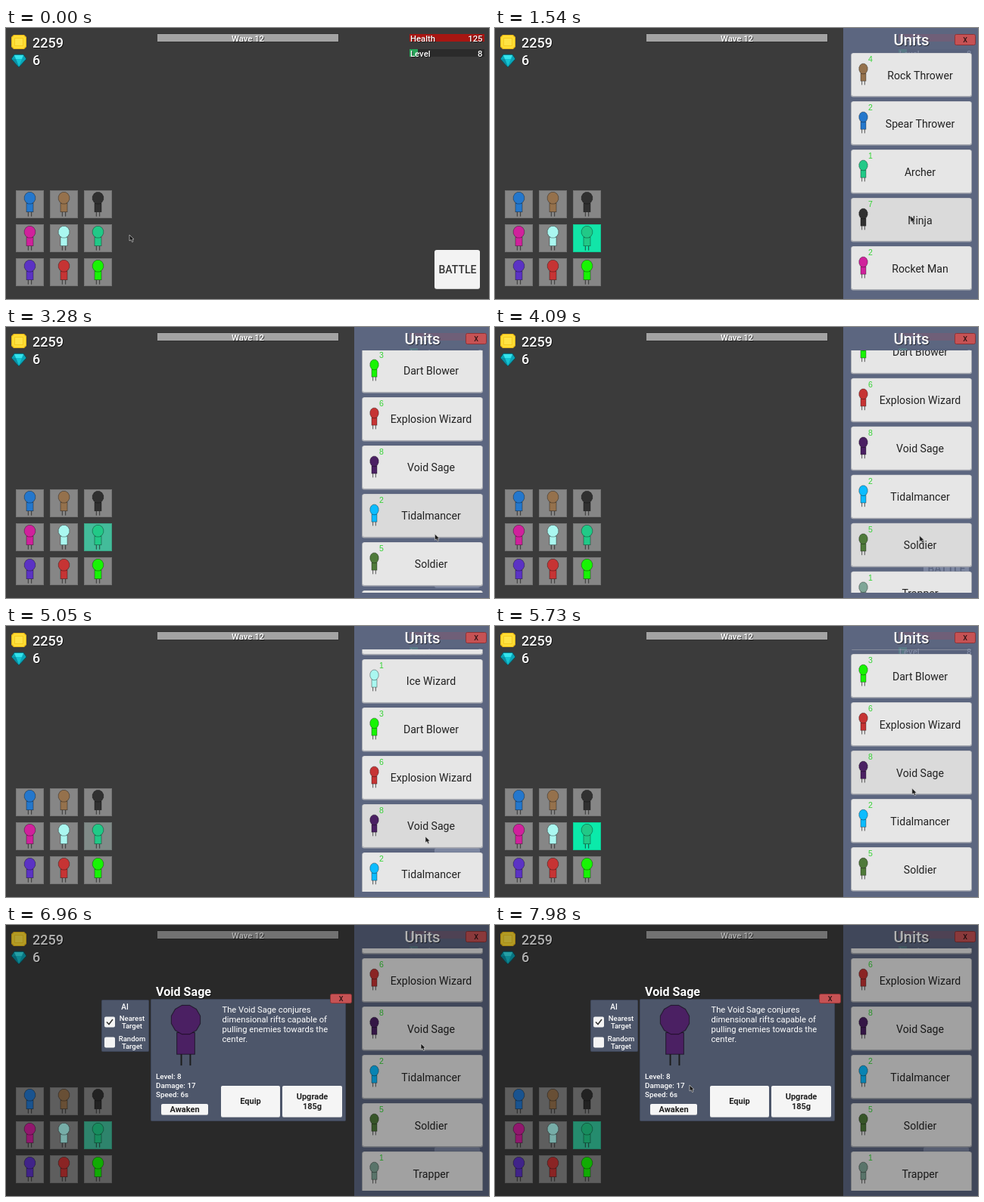
An HTML page with a canvas for the animation above (8 s loop, 638x359 px).

```html
<!DOCTYPE html>
<html lang="en">
<head>
<meta charset="utf-8">
<title>Unit menu</title>
<style>
html, body { margin: 0; width: 100%; height: 100%; overflow: hidden; background: #3b3b3b; }
canvas { display: block; }
</style>
</head>
<body>
<canvas id="stage" width="638" height="359"></canvas>
<script>
const ctx = document.getElementById('stage').getContext('2d');
const W = 638, H = 359, LOOP = 8000;
const OPEN = 440, POPUP = 6700, PULSE = 1055, PEAK = 375;

const C = {
  blue: '#2477cc', brown: '#95714c', black: '#303030', pink: '#d0219c',
  ice: '#aaf7f0', green: '#21c987', purple: '#5b32c4', red: '#c63434',
  lime: '#18f404', violet: '#4b2063', sky: '#0cbcff', olive: '#4f7a3a', sage: '#7fa697'
};
const SLOTS = ['blue', 'brown', 'black', 'pink', 'ice', 'green', 'purple', 'red', 'lime'];
const UNITS = [
  ['Rock Thrower', 'brown', 4], ['Spear Thrower', 'blue', 2], ['Archer', 'green', 1],
  ['Ninja', 'black', 7], ['Rocket Man', 'pink', 2], ['Lightning Wizard', 'purple', 11],
  ['Ice Wizard', 'ice', 1], ['Dart Blower', 'lime', 3], ['Explosion Wizard', 'red', 6],
  ['Void Sage', 'violet', 8], ['Tidalmancer', 'sky', 2], ['Soldier', 'olive', 5],
  ['Trapper', 'sage', 1]
];

// Keys: time, then values
const SCROLL = [[1750, 0], [2400, 151], [3280, 452], [3900, 498], [5050, 373],
  [6250, 498], [6450, 498], [6650, 501]];
const CURSOR = [[80, 163, 274], [210, 128, 282], [650, 128, 282], [1300, 549, 249],
  [1750, 549, 249], [2300, 559, 93], [2500, 559, 93], [3200, 567, 274],
  [5050, 554, 279], [6350, 548, 157], [7150, 548, 157], [7850, 257, 212]];

function track(keys, t) {
  if (t <= keys[0][0]) return keys[0].slice(1);
  for (let i = 1; i < keys.length; i++) {
    const a = keys[i - 1], b = keys[i];
    if (t < b[0]) {
      const k = (t - a[0]) / (b[0] - a[0]);
      return a.slice(1).map((v, j) => v + (b[j + 1] - v) * k);
    }
  }
  return keys[keys.length - 1].slice(1);
}

function rect(x, y, w, h, fill) {
  ctx.fillStyle = fill;
  ctx.fillRect(x, y, w, h);
}

function round(x, y, w, h, r, fill, stroke) {
  ctx.beginPath();
  ctx.roundRect(x, y, w, h, r);
  ctx.fillStyle = fill;
  ctx.fill();
  if (stroke) {
    ctx.lineWidth = 1;
    ctx.strokeStyle = stroke;
    ctx.stroke();
  }
}

function poly(points, fill, stroke, width = 1) {
  ctx.beginPath();
  points.forEach(([x, y]) => ctx.lineTo(x, y));
  ctx.closePath();
  ctx.fillStyle = fill;
  ctx.fill();
  if (stroke) {
    ctx.lineWidth = width;
    ctx.strokeStyle = stroke;
    ctx.stroke();
  }
}

function text(str, x, y, size, { color = '#fff', weight = 500, align = 'left', shadow = false, font = 'Roboto' } = {}) {
  ctx.font = `${weight} ${size}px ${font}, sans-serif`;
  ctx.textAlign = align;
  ctx.textBaseline = 'alphabetic';
  const base = y + size * 0.355;
  if (shadow) {
    ctx.fillStyle = 'rgba(0,0,0,.6)';
    ctx.fillText(str, x + 1, base + 1);
  }
  ctx.fillStyle = color;
  ctx.fillText(str, x, base);
}

// Stick unit; (x, y) is the middle of the head, rx and ry its radii
function unit(x, y, rx, ry, color) {
  const line = 'rgba(0,0,0,.5)', lw = Math.max(0.7, rx / 18), leg = Math.max(0.7, rx / 10);
  const bw = rx * 1.2, top = y + ry * 0.86, bh = ry * 1.45, foot = top + bh;
  for (const side of [-1, 1]) {
    rect(x + side * rx * 0.3 - leg / 2, foot, leg, ry * 0.75, '#1c1c1c');
  }
  rect(x - bw / 2, top, bw, bh, color);
  ctx.lineWidth = lw;
  ctx.strokeStyle = line;
  ctx.strokeRect(x - bw / 2, top, bw, bh);
  const ring = Array.from({ length: 12 }, (_, i) => {
    const a = (i + 0.5) * Math.PI / 6;
    return [x + Math.cos(a) * rx, y + Math.sin(a) * ry];
  });
  poly(ring, color, line, lw);
}

function coin() {
  poly([[10, 9], [24, 9], [27, 12], [27, 25], [24, 28], [10, 28], [7, 25], [7, 12]], '#eab818');
  poly([[11, 10], [23, 10], [26, 13], [26, 24], [23, 27], [11, 27], [8, 24], [8, 13]], '#ffdd33');
  rect(11, 13, 12, 11, '#f5cb22');
  rect(12, 14, 10, 9, '#ffe345');
}

function gem() {
  poly([[11, 35], [23, 35], [27, 41], [17, 52], [7, 41]], '#0aa6b8', '#0b4f5b');
  poly([[11, 36], [23, 36], [21, 41], [13, 41]], '#35e3ec');
  poly([[13, 41], [21, 41], [17, 51]], '#12c4d2');
  poly([[8, 41], [13, 41], [17, 51]], '#0c8fa4');
}

function hud() {
  coin();
  gem();
  text('2259', 35, 19.6, 18, { shadow: true });
  text('6', 35, 42.6, 18, { shadow: true });

  rect(200, 7, 240, 12, '#323232');
  rect(200, 8, 239, 10, '#a3a3a3');
  text('Wave 12', 319.5, 13.5, 11.3, { align: 'center', shadow: true });

  rect(533, 8, 99, 10, '#a81612');
  text('Health', 534, 13.5, 11.3, { shadow: true });
  text('125', 629.5, 13.5, 11.3, { align: 'right', shadow: true });
  rect(533, 28, 99, 10, '#2b2b2b');
  rect(533, 28, 11, 10, '#27a458');
  text('Level', 534, 33.5, 11.3, { shadow: true });
  text('8', 629.5, 33.5, 11.3, { align: 'right', shadow: true });

  round(566, 295, 60, 51, 3, '#c9c9c9');
  round(566, 294, 60, 51, 3, '#f3f3f3');
  text('BATTLE', 596.5, 320.5, 14, { color: '#333', align: 'center' });
}

function slots(t) {
  const glow = t < OPEN ? 0 : 0.5 + 0.5 * Math.cos((t - PEAK) / PULSE * 2 * Math.PI);
  const mix = (a, b) => Math.round(a + (b - a) * glow);
  SLOTS.forEach((name, i) => {
    const x = 13 + i % 3 * 45, y = 215 + Math.floor(i / 3) * 45;
    const fill = i === 5 ? `rgb(${mix(134, 4)},${mix(134, 240)},${mix(134, 172)})` : '#868686';
    rect(x, y, 37, 37, fill);
    ctx.lineWidth = 1;
    ctx.strokeStyle = 'rgba(0,0,0,.12)';
    ctx.strokeRect(x + 0.5, y + 0.5, 36, 36);
    unit(x + 18.5, y + 10.2, 7.5, 8, C[name]);
  });
}

function closeButton(x, y, w, h) {
  round(x + 0.5, y + 0.5, w - 1, h - 1, 2, '#c65254', '#8d3336');
  text('X', x + w / 2, y + h / 2 + 0.5, 9, { color: '#2c1214', align: 'center' });
}

function panel(t, mx, my) {
  rect(460, 0, 178, H, 'rgba(99,111,143,.82)');
  text('Units', 550, 16, 20.4, { align: 'center', shadow: true });
  closeButton(607, 8, 28, 15);

  const [scroll] = track(SCROLL, t);
  ctx.save();
  ctx.beginPath();
  ctx.rect(462, 31, 176, 321);
  ctx.clip();
  UNITS.forEach(([name, color, count], i) => {
    const y = 32.5 + i * 64 - scroll;
    if (y > 352 || y < -30) return;
    const over = t < POPUP && mx > 470 && mx < 630 && my >= y && my <= y + 58;
    round(470, y + 1, 160, 58, 3, '#aeb0b5');
    round(470.5, y + 0.5, 159, 57.5, 3, over ? '#dadada' : '#e6e6e6', 'rgba(70,76,95,.25)');
    unit(486.5, y + 21.5, 5.8, 7, C[color]);
    text(count, 493, y + 9, 10.5, { color: '#35d335', weight: 400, font: '"Liberation Sans"' });
    text(name, 561.5, y + 30, 14.1, { color: '#222', weight: 400, align: 'center' });
  });
  ctx.restore();
}

function option(label, y, checked) {
  round(130, y - 7, 14, 14, 2, '#f4f4f4');
  if (checked) {
    ctx.beginPath();
    ctx.moveTo(133, y);
    ctx.lineTo(136, y + 3);
    ctx.lineTo(141, y - 3.5);
    ctx.lineWidth = 1.5;
    ctx.strokeStyle = '#333';
    ctx.stroke();
  }
  text(label, 166.5, y - 5, 9.5, { align: 'center' });
  text('Target', 166.5, y + 5.5, 9.5, { align: 'center' });
}

function button(lines, x, y, w, h) {
  round(x, y + 1, w, h, 2, '#b9bbc0');
  round(x, y, w, h, 2, '#f5f5f5');
  lines.forEach((s, i) => {
    const dy = (i - (lines.length - 1) / 2) * 13;
    text(s, x + w / 2, y + h / 2 + dy, 11, { color: '#222', weight: 700, align: 'center' });
  });
}

function popup() {
  rect(0, 0, W, H, 'rgba(0,0,0,.3)');
  const fill = '#4d566a', edge = '#3d4558';
  round(126.5, 99.5, 62, 68, 1, fill, edge);
  text('AI', 157, 108.5, 10, { align: 'center' });
  option('Nearest', 128.5, true);
  option('Random', 155.5, false);

  round(191.5, 98.5, 257, 161, 1, fill, edge);
  text('Void Sage', 198, 88.5, 16.1, { weight: 700, shadow: true });
  closeButton(428, 91, 29, 13);
  unit(237.5, 125.5, 19.8, 19.8, C.violet);
  ['The Void Sage conjures', 'dimensional rifts capable of', 'pulling enemies towards the', 'center.']
    .forEach((s, i) => text(s, 285.5, 112.5 + i * 13, 11.2, { weight: 400 }));
  ['Level: 8', 'Damage: 17', 'Speed: 6s']
    .forEach((s, i) => text(s, 198, 200.5 + i * 12, 9.8));
  button(['Awaken'], 205, 237, 62, 14);
  button(['Equip'], 284, 213, 78, 41);
  button(['Upgrade', '185g'], 365, 213, 79, 41);
}

function cursor(x, y) {
  poly([[0, 0], [0, 8], [2, 6.5], [3.5, 9.5], [5, 9], [3.8, 6], [6, 5.8]]
    .map(([dx, dy]) => [x + dx, y + dy]), '#1c1c1c', 'rgba(215,215,215,.8)', 0.8);
}

function draw(t) {
  const [mx, my] = track(CURSOR, t);
  rect(0, 0, W, H, '#3b3b3b');
  hud();
  slots(t);
  if (t >= OPEN) panel(t, mx, my);
  if (t >= POPUP) popup();
  cursor(mx, my);
}

const start = performance.now();
function tick() {
  draw((performance.now() - start) % LOOP);
  requestAnimationFrame(tick);
}
tick();
</script>
</body>
</html>
```
